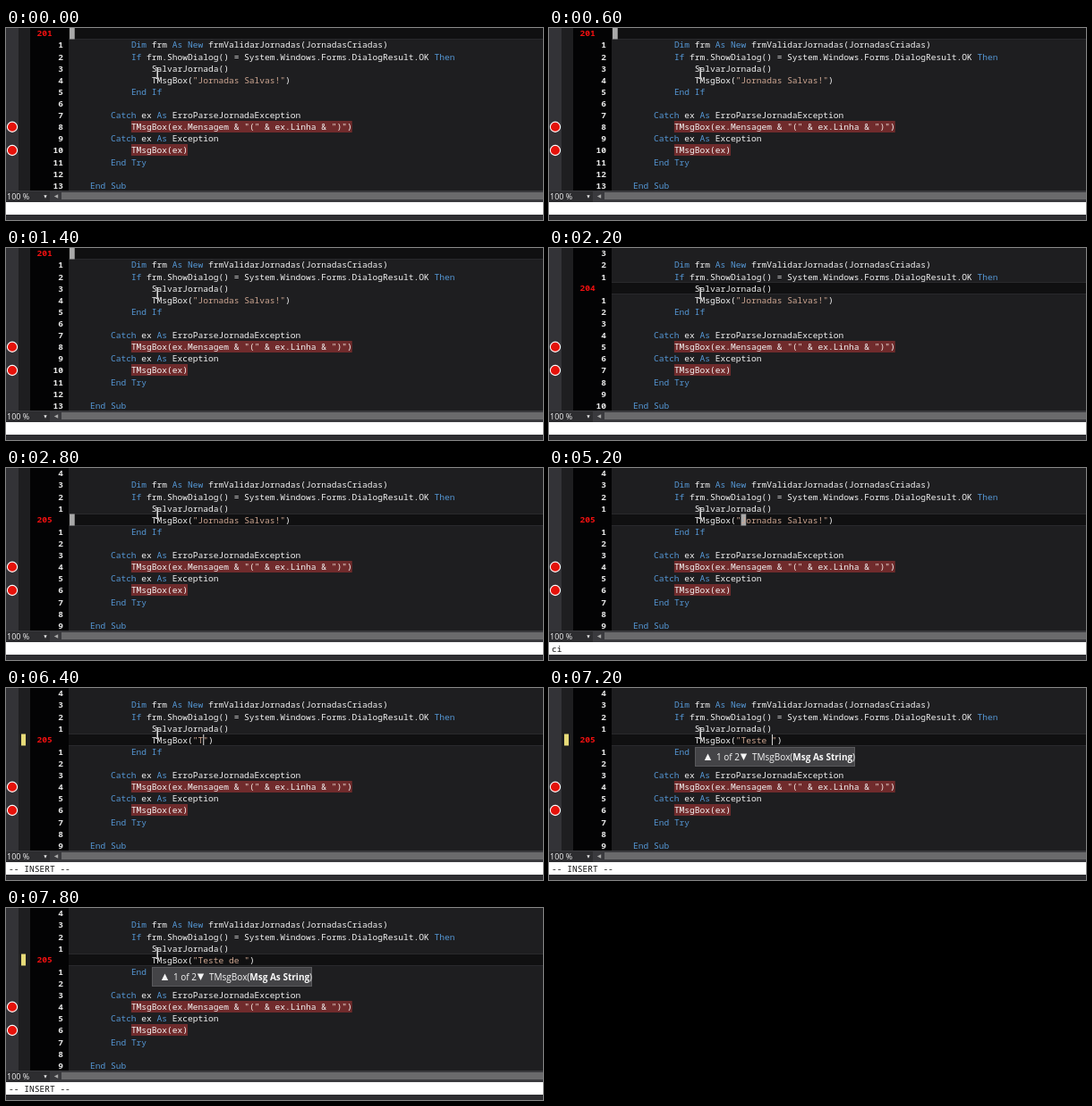
Animation of 600x215 px, one loop 8 s. Source, as an HTML page with a canvas:

```html
<!DOCTYPE html>
<html lang="pt">
<head>
<meta charset="utf-8">
<style>
html, body { margin: 0; width: 100%; height: 100%; overflow: hidden; background: #1e1e20; }
canvas { display: block; }
</style>
</head>
<body>
<canvas width="600" height="215"></canvas>
<script>
const ctx = document.querySelector('canvas').getContext('2d');
const LOOP = 8000, CHAR = 5.74, ROW = 13.11;
const MONO = '9.57px "Noto Sans Mono", monospace';
const UI = 'px "Open Sans", sans-serif';
const TOKEN = /\b(Dim|As|New|If|Then|End|Catch|Try|Sub)\b|(".*?")/;

const colX = col => 71 + col * CHAR;
const rowY = row => 19 + row * ROW;

// Each entry: indent, text, breakpoint flag; rows start at 0.
const code = message => [
  [12, 'Dim frm As New frmValidarJornadas(JornadasCriadas)'],
  [12, 'If frm.ShowDialog() = System.Windows.Forms.DialogResult.OK Then'],
  [16, 'SalvarJornada()'],
  [16, `TMsgBox("${message}")`],
  [12, 'End If'],
  [0, ''],
  [8, 'Catch ex As ErroParseJornadaException'],
  [12, 'TMsgBox(ex.Mensagem & "(" & ex.Linha & ")")', true],
  [8, 'Catch ex As Exception'],
  [12, 'TMsgBox(ex)', true],
  [8, 'End Try'],
  [0, ''],
  [4, 'End Sub']
];

// Editor state changes, each merged over the ones before it.
const steps = [
  [0, { line: 201, col: 0, message: 'Jornadas Salvas!', command: '', block: true, caret: false, edited: false, tip: false }],
  [200, { block: false }],
  [600, { block: true }],
  [1000, { block: false }],
  [1400, { block: true }],
  [1600, { line: 203 }],
  [1800, { line: 204 }],
  [2200, { block: false }],
  [2800, { line: 205, block: true }],
  [3000, { col: 16 }],
  [3200, { col: 25 }],
  [3600, { block: false }],
  [4200, { block: true }],
  [4400, { command: 'c' }],
  [4600, { block: false }],
  [4800, { command: 'ci' }],
  [5200, { block: true }],
  [5600, { message: '', command: '-- INSERT --', block: false, caret: true, edited: true }],
  [6000, { caret: false }],
  [6200, { caret: true }],
  [6400, { message: 'T' }],
  [6600, { message: 'Te' }],
  [6800, { message: 'Tes' }],
  [7000, { message: 'Teste' }],
  [7200, { message: 'Teste ', tip: true }],
  [7400, { message: 'Teste d' }],
  [7600, { message: 'Teste de' }],
  [7800, { message: 'Teste de ', caret: false }]
];

const stateAt = t => Object.assign({}, ...steps.filter(s => s[0] <= t).map(s => s[1]));

function rect(x, y, w, h, color) {
  ctx.fillStyle = color;
  ctx.fillRect(x, y, w, h);
}

function text(str, x, y, color, font = MONO, align = 'left') {
  ctx.font = font;
  ctx.textAlign = align;
  ctx.fillStyle = color;
  ctx.fillText(str, x, y + 3.4);
}

function triangle(x, y, dx, dy, color) {
  ctx.fillStyle = color;
  ctx.beginPath();
  ctx.moveTo(x + dx, y + dy);
  ctx.lineTo(x - dx - dy, y - dy - dx);
  ctx.lineTo(x - dx + dy, y - dy + dx);
  ctx.fill();
}

function breakpoint(y) {
  ctx.beginPath();
  ctx.arc(7, y, 5.6, 0, 7);
  ctx.fillStyle = '#e5120a';
  ctx.fill();
  ctx.strokeStyle = '#fff';
  ctx.lineWidth = 1.1;
  ctx.stroke();
}

function tokenColor(part, stop) {
  if (part[0] === '"') return stop ? '#f2e4de' : '#d0a893';
  return TOKEN.test(part) ? '#5598d6' : '#f4f4f4';
}

function drawCode(state) {
  code(state.message).forEach(([indent, str, stop], row) => {
    const y = rowY(row);
    if (stop) {
      rect(colX(indent), Math.round(y - 6.5), str.length * CHAR, 13, '#702b2c');
      breakpoint(y);
    }
    let col = indent;
    for (const part of str.split(TOKEN).filter(Boolean)) {
      text(part, colX(col), y, tokenColor(part, stop), '500 ' + MONO);
      col += part.length;
    }
  });
}

function drawNumbers(current) {
  for (let row = -1; row < 13; row++) {
    const distance = Math.abs(row - current);
    if (distance) text(distance, 64, rowY(row), '#e8e8e8', 'bold ' + MONO, 'right');
  }
}

function drawTip() {
  const font = 10 + UI, y = 77.3;
  rect(163, 66, 179, 22, '#59595c');
  rect(164, 67, 177, 20, '#444447');
  triangle(177.5, y, 0, -3.7, '#f4f4f4');
  text('1 of 2', 187, y, '#f4f4f4', font);
  triangle(217.5, y, 0, 3.7, '#f4f4f4');
  let x = 227;
  for (const [part, weight] of [['TMsgBox(', ''], ['Msg As String', 'bold '], [')', '']]) {
    text(part, x, y, '#f8f8f8', weight + font);
    x += ctx.measureText(part).width;
  }
}

function drawMouse() {
  rect(168.5, 45, 1.5, 11, '#ddd');
  rect(167, 44, 4, 1, '#ccc');
  rect(167, 56, 4, 1, '#ccc');
}

function drawFooter(command) {
  rect(0, 182, 600, 13, '#3a3a3e');
  rect(0, 183, 49, 12, '#2d2d30');
  text('100 %', 1, 189, '#f4f4f4', 9 + UI);
  triangle(44, 189, 0, 1.7, '#eee');
  triangle(56, 188.5, -2.2, 0, '#aaa');
  rect(62, 184, 538, 8, '#6a6a6c');
  rect(0, 195, 600, 14, '#fff');
  text(command, 3, 202.3, '#111');
  rect(0, 209, 600, 6, '#2d2d30');
}

function draw(t) {
  const state = stateAt(t);
  const current = state.line - 202;
  const y = Math.round(rowY(current));

  rect(0, 0, 600, 215, '#1e1e20');
  rect(0, 0, 14, 182, '#333337');
  rect(27, 0, 43, 182, '#030304');
  rect(70, y - 7, 530, 14, '#29292c');
  rect(70, y - 6, 530, 12, '#101011');
  if (state.edited) rect(17, y - 6.5, 5, 13, '#e6da78');

  drawNumbers(current);
  text(state.line, 34.5, y, '#f01010', 'bold ' + MONO);
  if (state.block) rect(colX(state.col), y - 6.5, CHAR, 13, '#a8a8a8');
  drawCode(state);
  if (state.caret) rect(colX(25 + state.message.length), y - 6, 1, 12, '#ddd');
  if (state.tip) drawTip();
  drawMouse();
  drawFooter(state.command);
}

function frame() {
  draw(performance.now() % LOOP);
  requestAnimationFrame(frame);
}
frame();
</script>
</body>
</html>
```
